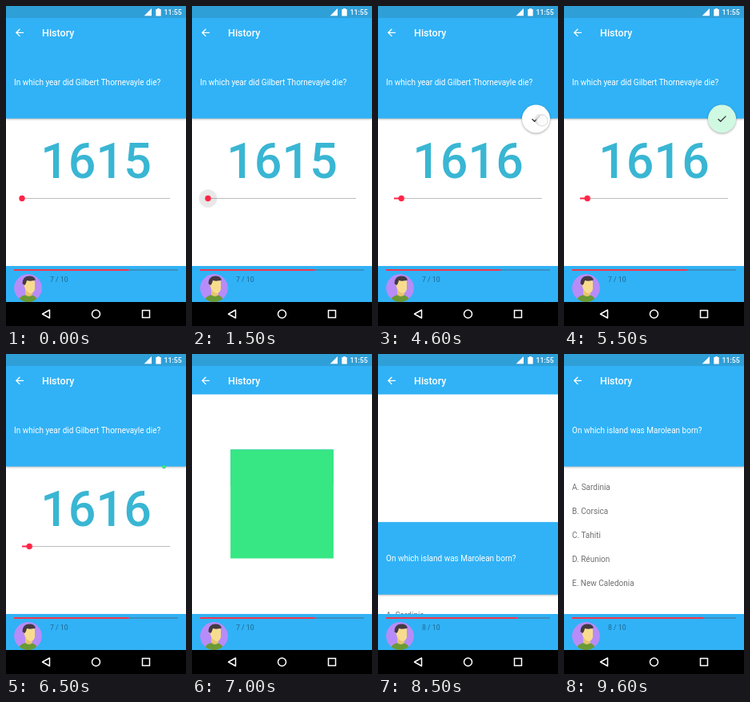
An HTML page that plays this animation: 225 px wide and 400 px high, repeating every 9900 ms.

```html
<!DOCTYPE html>
<html lang="en">
<head>
<meta charset="utf-8">
<title>Quiz</title>
<style>
  html, body { margin: 0; width: 100%; height: 100%; overflow: hidden; background: #fff; }
  svg { display: block; width: 225px; height: 400px; font-family: Roboto, sans-serif; }
  .anim, .step { animation: 9900ms linear infinite; }
  .step { animation-timing-function: step-end; }

  .blue { fill: #31b2f6; }
  .red { fill: #ff2446; }
  .title { font-size: 12.5px; font-weight: 500; fill: #fff; }
  .clock { font-size: 8.75px; font-weight: 500; fill: #fff; }
  .question { font-size: 10px; fill: #fff; }
  .answer { font-size: 10px; fill: #707070; }
  .count { font-size: 8.75px; fill: #000; fill-opacity: .42; }
  .year { font-size: 61px; font-weight: 500; fill: #39b6d3; text-anchor: middle; }
  .panel { filter: drop-shadow(0 1px 1px rgba(0, 0, 0, .28)); }

  /* slider */
  .year-old { animation-name: until-drag; }
  .year-new { animation-name: from-drag; }
  .thumb { animation-name: thumb; }
  .track { animation-name: track; transform-origin: 20px 0; }
  .halo { animation-name: halo; transform-origin: 20px 240.5px; }
  @keyframes until-drag { 0% { opacity: 1 } 18.18%, 100% { opacity: 0 } }
  @keyframes from-drag { 0% { opacity: 0 } 18.18%, 100% { opacity: 1 } }
  @keyframes thumb { 0% { transform: none } 18.18%, 100% { transform: translateX(9.25px) } }
  @keyframes track { 0% { transform: scaleX(0) } 18.18%, 100% { transform: scaleX(1) } }
  @keyframes halo {
    0%, 12.6% { transform: scale(0); opacity: 1 }
    15.2%, 28.3% { transform: scale(1); opacity: 1 }
    31.3%, 100% { transform: scale(1); opacity: 0 }
  }

  /* submit button */
  .fab { animation-name: fab; transform-origin: 197.5px 141px; }
  .disc { animation-name: disc; filter: drop-shadow(0 1.5px 1.5px rgba(0, 0, 0, .35)); }
  .ripple { animation-name: ripple; transform-origin: 203px 142px; }
  .finger { animation-name: finger; }
  @keyframes fab {
    0%, 18.18% { transform: scale(0); animation-timing-function: cubic-bezier(0, 0, .2, 1) }
    22.22%, 64.44% { transform: scale(1) }
    65.86%, 100% { transform: scale(0) }
  }
  @keyframes disc { 0%, 54% { fill: #fff } 60.6%, 100% { fill: #37e783 } }
  @keyframes ripple {
    0%, 42% { transform: scale(0); opacity: 1 }
    46.4% { transform: scale(.46); opacity: 1 }
    50% { transform: scale(1); opacity: 1 }
    52.5%, 100% { transform: scale(1); opacity: 0 }
  }
  @keyframes finger {
    0%, 41.4% { opacity: 0 }
    43%, 50% { opacity: 1 }
    52%, 100% { opacity: 0 }
  }

  /* cards */
  .leave { animation-name: leave; }
  .shrink { animation-name: shrink; transform-origin: 112.5px 187.5px; }
  .cover { animation-name: cover; }
  .enter { animation-name: enter; }
  @keyframes leave {
    0%, 77.2% { transform: none }
    80.8%, 100% { transform: translateY(-275px) }
  }
  @keyframes shrink {
    0%, 66.97% { transform: none; animation-timing-function: cubic-bezier(0, 0, .2, 1) }
    74.14%, 100% { transform: scale(.5, .4091) }
  }
  @keyframes cover { 0%, 65.8% { fill-opacity: 0 } 67.7%, 100% { fill-opacity: 1 } }
  @keyframes enter {
    0%, 85.15% { transform: translateY(275px) }
    86.87%, 100% { transform: none }
  }

  /* progress */
  .before { animation-name: before; }
  .after { animation-name: after; }
  @keyframes before { 0% { opacity: 1 } 77.77%, 100% { opacity: 0 } }
  @keyframes after { 0% { opacity: 0 } 77.77%, 100% { opacity: 1 } }
</style>
</head>
<body>
<svg viewBox="0 0 225 400">
  <defs>
    <clipPath id="stage"><rect y="50" width="225" height="275"/></clipPath>
    <clipPath id="face"><circle cx="27.5" cy="352.5" r="17.5"/></clipPath>
  </defs>
  <rect width="225" height="400" fill="#fff"/>

  <g clip-path="url(#stage)">
    <g class="anim leave"><g class="anim shrink">
      <rect y="50" width="225" height="275" fill="#fff"/>
      <rect class="blue panel" y="50" width="225" height="90.6"/>
      <text class="question" x="10" y="99.2">In which year did Gilbert Thornevayle die?</text>
      <text class="year step year-old" x="112.5" y="214.5">1615</text>
      <text class="year step year-new" x="112.5" y="214.5">1616</text>

      <rect x="20" y="240" width="185" height="1" fill="#bdbdbd"/>
      <rect class="red step track" x="20" y="239.5" width="9.25" height="2"/>
      <g class="step thumb">
        <circle class="anim halo" cx="20" cy="240.5" r="11.5" fill="#000" fill-opacity=".09"/>
        <circle class="red" cx="20" cy="240.5" r="3.7"/>
      </g>

      <g class="anim fab">
        <circle class="anim disc" cx="197.5" cy="141" r="17.5"/>
        <circle class="anim ripple" cx="201" cy="142" r="15" fill="#000" fill-opacity=".08"/>
        <path d="M192.6 141.2l3.1 3.1 6.7-6.7" fill="none" stroke="#333" stroke-width="1.3"/>
      </g>
      <circle class="anim finger" cx="205" cy="143" r="7" fill="#fff" fill-opacity=".75" stroke="#ccc" stroke-width=".8"/>
      <rect class="anim cover" y="50" width="225" height="275" fill="#37e783"/>
    </g></g>

    <g class="anim enter">
      <rect y="50" width="225" height="275" fill="#fff"/>
      <rect class="blue panel" y="50" width="225" height="90.6"/>
      <text class="question" x="10" y="99.2">On which island was Marolean born?</text>
      <g class="answer">
        <text x="10" y="169.5">A. Sardinia</text>
        <text x="10" y="199.5">B. Corsica</text>
        <text x="10" y="229.5">C. Tahiti</text>
        <text x="10" y="259.5">D. Réunion</text>
        <text x="10" y="289.5">E. New Caledonia</text>
      </g>
    </g>
  </g>

  <!-- status bar and toolbar -->
  <rect class="blue" width="225" height="50.5"/>
  <rect width="225" height="15" fill="#2f9fd8"/>
  <path d="M182 3v9.3h-9.3zM187.3 4h1.8v-1h2.8v1h1.8v8.5h-6.4z" fill="#fff"/>
  <text class="clock" x="197.5" y="11.2">11:55</text>
  <path d="M22 33.3H13M17.4 28.7l-4.6 4.6 4.6 4.6" fill="none" stroke="#fff" stroke-width="1.3"/>
  <text class="title" x="45" y="37.8">History</text>

  <!-- footer -->
  <rect class="blue" y="325" width="225" height="45"/>
  <rect x="10" y="329" width="205" height="2" fill="#3d8fbd"/>
  <g fill="#f2364f">
    <rect class="step before" x="10" y="329" width="143.5" height="2"/>
    <rect class="step after" x="10" y="329" width="164" height="2"/>
  </g>
  <text class="count step before" x="55" y="344.5">7 / 10</text>
  <text class="count step after" x="55" y="344.5">8 / 10</text>
  <g clip-path="url(#face)">
    <circle cx="27.5" cy="352.5" r="17.5" fill="#b78cf8"/>
    <path d="M15 371q1-9 10-10h6q8 1 9 10z" fill="#6a9a35"/>
    <path d="M24 355h9v6q-4 4-9 0z" fill="#e6c56f"/>
    <path d="M22 344q6-4 14 0v10q-1 5-6 5-8-3-8-15z" fill="#f8dc8d"/>
    <path d="M20.5 347q0-9 8-9.5 7-.5 8.5 5-6 2-11 .5-1 5-3 6z" fill="#443a43"/>
  </g>

  <!-- navigation bar -->
  <rect y="370" width="225" height="30"/>
  <g fill="none" stroke="#fff" stroke-width="1.5">
    <path d="M54.5 380v10l-9-5z" stroke-linejoin="round"/>
    <circle cx="112.5" cy="385" r="5"/>
    <rect x="170.5" y="380.5" width="9" height="9"/>
  </g>
</svg>
</body>
</html>
```
